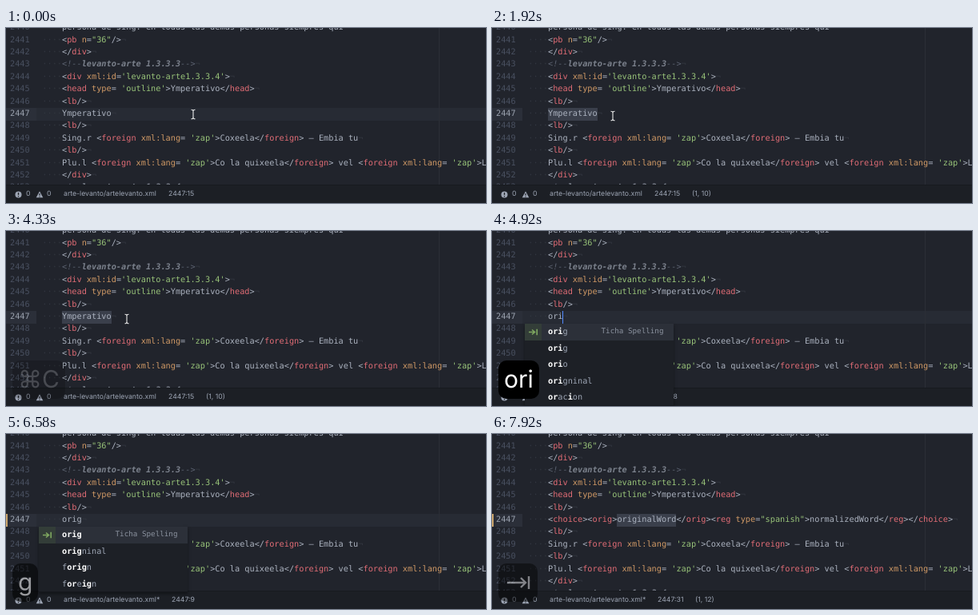
An HTML page that plays this animation: 600x219 px, repeating every 8 s.

```html
<!DOCTYPE html>
<html lang="en">
<head>
<meta charset="utf-8">
<title>Editor snippet</title>
<style>
html, body { margin: 0; width: 100%; height: 100%; overflow: hidden; background: #21242c; }
#stage { position: absolute; left: 0; top: 0; width: 600px; height: 219px; overflow: hidden; background: #21242c;
  color: #abb2bf; font: 10.25px/15.4px "DejaVu Sans Mono", monospace; text-rendering: geometricPrecision; }
#stage * { box-sizing: border-box; }
#stage div, #stage svg { position: absolute; }
#lines, #keys, #pointer { left: 0; top: 0; }
.num, .code, #popup div, #status div, .key { white-space: pre; }
.num { left: 5px; color: #495060; }
.num.active { color: #9aa1ae; }
.code { left: 45.3px; }
.dim { color: #333740; }
.tag { color: #e06c75; }
.attr { color: #d19a66; }
.str { color: #98c379; }
.note { color: #5c6370; font-style: italic; }
.note b { color: #7b818c; }
#band { left: 38px; top: 100px; width: 562px; height: 15.5px; background: #272b34; }
#gutter { left: 0; top: 100px; width: 38px; height: 15.5px; background: #2b2f39; }
#changed { left: 0; top: 100px; width: 1.5px; height: 15.5px; background: #c8a26a; }
#selection { top: 100px; height: 15.5px; background: #3a3f4b; }
#guide { left: 541px; top: 0; width: 1px; height: 197px; background: #2b2e36; }
#caret { top: 100px; width: 1.4px; height: 15.5px; background: #528bff; }
#status { left: 0; top: 196px; width: 600px; height: 23px; background: #1c1f25; border-top: 1px solid #171a1f;
  color: #9da5b4; font: 8.7px/23px Inter, sans-serif; }
#status div { top: 0; }
#popup { left: 41px; top: 116px; width: 186px; background: #1d2026; border-bottom: 1px solid #16181d;
  box-shadow: 0 2px 4px #0006; line-height: 20.6px; color: #9da5b4; }
#popup div { left: 0; width: 186px; height: 20.6px; padding-left: 29px; }
#popup div.first { background: #2c3039; }
#popup b { color: #fff; }
#popup small { position: absolute; right: 12.5px; top: 0; font-size: 9.26px; color: #8a919e; }
.key { left: 8px; height: 48px; padding: 0 7px; border-radius: 10px; background: #000; color: #fff;
  font: 30px/48px Inter, "DejaVu Sans", sans-serif; }
#stage .key svg { position: static; display: block; }
</style>
</head>
<body>
<div id="stage">
  <div id="band"></div><div id="gutter"></div><div id="changed"></div><div id="selection"></div><div id="guide"></div>
  <div id="lines"></div>
  <div id="caret"></div>
  <div id="status">
    <svg width="60" height="22" style="left:0;top:0">
      <circle cx="15.5" cy="11.5" r="4" fill="#9da5b4"/>
      <path d="M42 7.3L46.3 15.3H37.7Z" fill="#9da5b4"/>
      <path d="M15.5 9v3M15.5 13v1.2M42 10v2.6M42 13.4v1" stroke="#1c1f25" stroke-width="1.2"/>
    </svg>
    <div style="left:25px">0</div><div style="left:51px">0</div>
    <div id="file" style="left:72px"></div><div id="place"></div><div id="extent"></div>
  </div>
  <div id="popup"></div>
  <svg id="pointer" width="8" height="14" fill="none" stroke="#e8e8e8" stroke-width="1.1">
    <path d="M1.5 1.2Q4 1.2 4 3V11Q4 12.8 1.5 12.8M6.5 1.2Q4 1.2 4 3M4 11Q4 12.8 6.5 12.8"/>
  </svg>
  <div id="keys"></div>
</div>
<script>
const LOOP = 8000, CHAR = 6.171, ROW = 15.4, TEXT_X = 70;
const FIRST = 2440, ACTIVE = 2447;
const $ = id => document.getElementById(id);
const span = (kind, text) => `<span class="${kind}">${text}</span>`;

// Event times in ms
const DRAG = 1100, COPY = 2950, KEY_O = 4450, KEY_R = 4600, KEY_I = 4750, POPUP = 4820;
const DIRTY = 5100, KEY_G = 5350, EXPAND = 7640, KEY_TAB = 7800;
const HOLD = 1050, FADE = 400;

const SNIPPET = '<choice><orig>originalWord</orig><reg type="spanish">normalizedWord</reg></choice>';
const zap = word => `<foreign xml:lang= 'zap'>${word}</foreign>`;
const source = [
  'persona de sing. en todas las demas personas siempres qui',
  '<pb n="36"/>',
  '</div>',
  '<!--levanto-arte 1.3.3.3-->',
  "<div xml:id='levanto-arte1.3.3.4'>",
  "<head type= 'outline'>Ymperativo</head>",
  '<lb/>',
  'Ymperativo',
  '<lb/>',
  `Sing.r ${zap('Coxeela')} – Embia tu`,
  '<lb/>',
  `Plu.l ${zap('Co la quixeela')} vel ${zap('Lani')}`,
  '</div>',
  '<!--levanto-arte 1.3.3.4-->'
];

function highlight(line) {
  const note = line.match(/^<!--(.*)-->$/);
  if (note) return span('note', `&lt;!--<b>${note[1]}</b>--&gt;`);
  return line.replace(/(<\/?)(\w+)|([\w:]+)=|(['"]).*?\4|[<>]/g, (all, open, tag, attr, quote) =>
    tag ? open.replace('<', '&lt;') + span('tag', tag)
    : attr ? span('attr', attr) + '='
    : quote ? span('str', all)
    : all === '<' ? '&lt;' : '&gt;');
}
const codeLine = line => span('dim', '····') + highlight(line) + span('dim', '¬');

$('lines').innerHTML = source.map((line, i) => {
  const top = 100 + (FIRST + i - ACTIVE) * ROW;
  const active = FIRST + i === ACTIVE;
  return `<div class="num${active ? ' active' : ''}" style="top:${top}px">${FIRST + i}</div>
    <div class="code"${active ? ' id="active"' : ''} style="top:${top}px">${codeLine(line)}</div>`;
}).join('');

// Asterisks enclose the matched letters
const LISTS = {
  ori: ['*ori*g', '*ori*g', '*ori*o', '*ori*gninal', '*or*ac*i*on'],
  orig: ['*orig*', '*orig*ninal', 'f*orig*n', 'f*or*e*ig*n']
};
const ICON = `<svg width="20.6" height="20.6" style="left:0;top:0;background:#333d38" fill="none" stroke="#7fa860" stroke-width="1.6">
  <path d="M5 10.5H12M9 7.5L12.5 10.5L9 13.5M15.2 6.8V14.2"/></svg>`;
const TAB = `<svg width="35" height="48" fill="none" stroke="#fff" stroke-width="2.4">
  <path d="M4 24H27M21 18L27 24L21 30M31 16V32"/></svg>`;

const popupHtml = rows => rows.map((row, i) =>
  `<div class="${i ? '' : 'first'}" style="top:${i * 20.6}px">${i ? '' : ICON}` +
  row.replace(/\*(.*?)\*/g, '<b>$1</b>') + (i ? '' : '<small>Ticha Spelling</small>') + '</div>').join('');

const clamp = (v, lo = 0, hi = 1) => Math.min(hi, Math.max(lo, v));
const PATH = [[0, 234, 108], [450, 234, 108], [830, 130, 108], [1030, 68, 108], [DRAG, 68, 108], [1560, 151, 110], [LOOP, 151, 110]];
function pointerAt(t) {
  const i = PATH.findIndex(p => p[0] > t);
  const [t0, x0, y0] = PATH[i - 1], [t1, x1, y1] = PATH[i];
  const k = (t - t0) / (t1 - t0), e = k * k * (3 - 2 * k);
  return [x0 + (x1 - x0) * e, y0 + (y1 - y0) * e];
}

const cache = {};
function setHtml(id, html) {
  if (cache[id] !== html) $(id).innerHTML = cache[id] = html;
}
const show = (id, on) => $(id).style.visibility = on ? 'visible' : 'hidden';

function keyBox(label, top, alpha) {
  return alpha > 0 ? `<div class="key" style="top:${top}px;opacity:${alpha.toFixed(3)}">${label}</div>` : '';
}
const fadeOut = (t, last) => 1 - clamp((t - last - HOLD) / FADE);

function render(t) {
  const typed = t < KEY_O ? '' : t < KEY_R ? 'o' : t < KEY_I ? 'or' : t < KEY_G ? 'ori' : 'orig';
  const expanded = t >= EXPAND;
  const [px, py] = pointerAt(t);

  let from = 0, length = 0;
  if (expanded) [from, length] = [14, 12];
  else if (!typed && t >= DRAG) length = clamp(Math.round((px - TEXT_X) / CHAR), 0, 10);

  setHtml('active', codeLine(expanded ? SNIPPET : typed || 'Ymperativo'));
  $('selection').style.left = TEXT_X + from * CHAR + 'px';
  $('selection').style.width = length * CHAR + 'px';
  show('band', !length);
  show('changed', t >= DIRTY);

  const lastKey = [KEY_G, KEY_I, KEY_R, KEY_O].find(k => t >= k);
  const blink = lastKey ? Math.floor((t - lastKey) / 400) % 2 === 0 : Math.floor(t / 400) % 2 === 1;
  const end = typed ? typed.length : t >= DRAG ? 0 : 10;
  $('caret').style.left = TEXT_X + end * CHAR - 0.5 + 'px';
  show('caret', blink && !length);

  const dirty = t >= DIRTY;
  const column = 5 + (length ? from + length : end);
  setHtml('file', 'arte-levanto/artelevanto.xml' + (dirty ? '*' : ''));
  setHtml('place', `${ACTIVE}:${column}`);
  setHtml('extent', length ? `(1, ${length})` : '');
  $('place').style.left = (dirty ? 207 : 203) + 'px';
  $('extent').style.left = (dirty ? 254 : 250) + 'px';

  const rows = t < KEY_G ? LISTS.ori : LISTS.orig;
  setHtml('popup', popupHtml(rows));
  $('popup').style.height = rows.length * 20.6 + 'px';
  show('popup', t >= POPUP && !expanded);

  $('pointer').style.transform = `translate(${px - 4}px, ${py - 7}px)`;
  show('pointer', !typed);

  let keys = '';
  if (t >= COPY) keys += keyBox('⌘C', 162, fadeOut(t, COPY));
  if (typed) keys += keyBox(typed.slice(0, 3), t < KEY_G ? 162 : 110, fadeOut(t, Math.min(lastKey, KEY_I)));
  if (t >= KEY_G) keys += keyBox('g', 162, fadeOut(t, KEY_G));
  if (t >= KEY_TAB) keys += keyBox(TAB, 162, clamp((t - KEY_TAB) / 280));
  setHtml('keys', keys);
}

const start = performance.now();
function tick() {
  render((performance.now() - start) % LOOP);
  requestAnimationFrame(tick);
}
tick();
</script>
</body>
</html>
```
